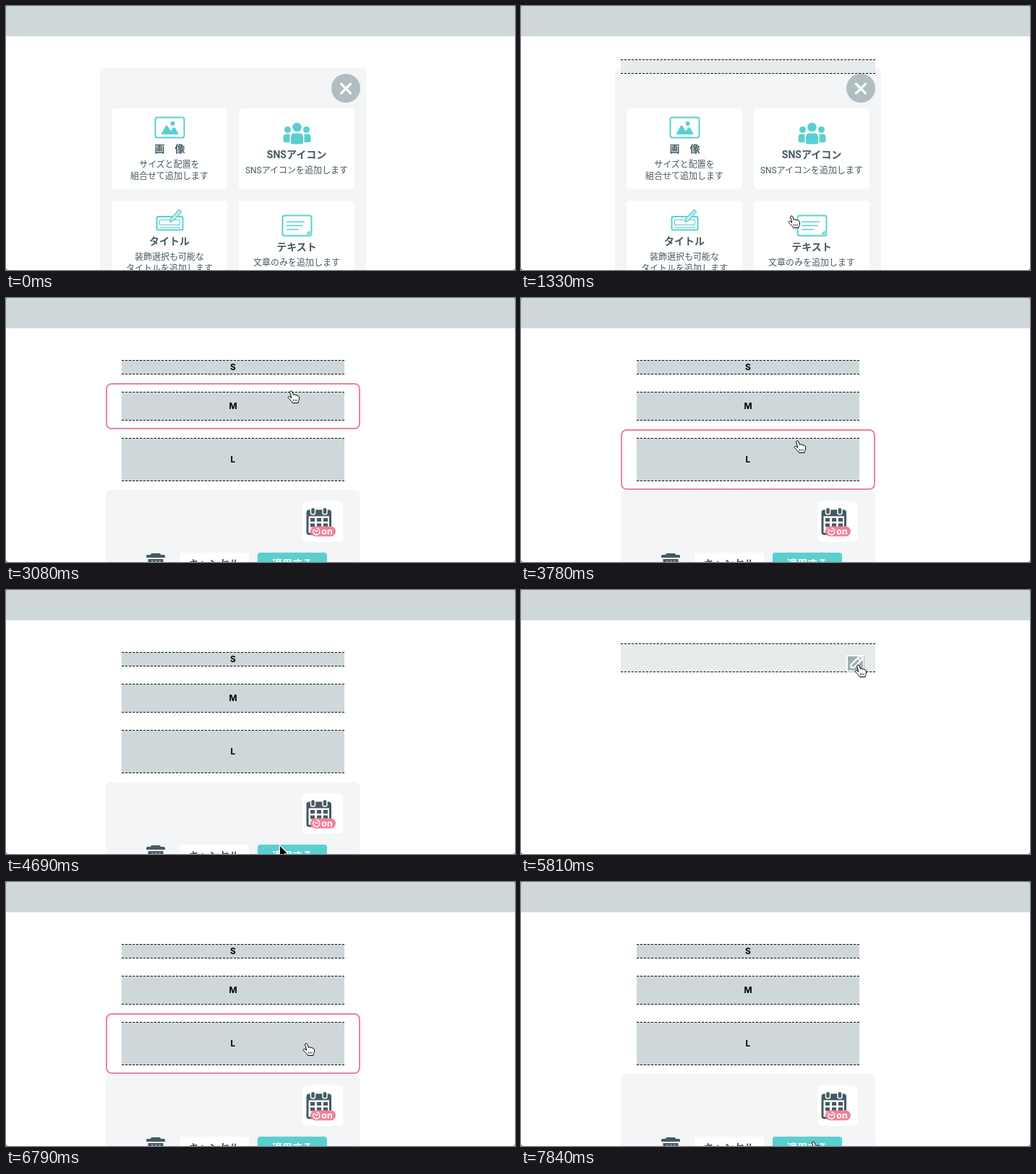
Recreate the animation shown at these times as an HTML page. Size 704 by 366 pixels, loop 8000 ms.

```html
<!DOCTYPE html>
<html lang="ja">
<head>
<meta charset="utf-8">
<title>Spacer block editor</title>
<style>
html, body { margin: 0; width: 100%; height: 100%; overflow: hidden; background: #444; }
svg { display: block; clip-path: inset(0 round 3px); }
text { font-family: Roboto, "Noto Sans CJK JP", "Noto Sans CJK", sans-serif; font-size: 12px; fill: #455a64; text-anchor: middle; }
.title { font-size: 14px; font-weight: 700; }
.size { font: 700 12px Inter, sans-serif; fill: #000; }
.dash { stroke: #000; }
.teal { fill: #5bcfd0; }
.line { fill: none; stroke: #5bcfd0; stroke-width: 2; }
.dark { fill: #455a64; }
.white { fill: #fff; }
.tray { fill: #f3f5f7; }
</style>
</head>
<body>
<svg width="704" height="366" viewBox="0 0 704 366">
  <rect width="704" height="366" fill="#fff"/>
  <rect width="704" height="42" fill="#ced7da"/>

  <g id="panel">
    <rect class="tray" x="130" y="86" width="368" height="300" rx="6"/>
    <circle cx="470" cy="114" r="20" fill="#b0bec1"/>
    <path d="M463.5 108l13 13m0-13l-13 13" stroke="#fff" stroke-width="3.2" stroke-linecap="round"/>
    <g class="white">
      <rect x="146" y="142" width="160" height="112" rx="5"/>
      <rect x="322" y="142" width="160" height="112" rx="5"/>
      <rect x="146" y="270" width="160" height="112" rx="5"/>
      <rect x="322" y="270" width="160" height="112" rx="5"/>
    </g>

    <rect class="line" x="206.5" y="154.5" width="40" height="28" rx="3"/>
    <circle class="teal" cx="230.5" cy="163" r="3"/>
    <path class="teal" d="M214.5 178l6-11.500q1.500-2 3 0l4.500 7 3-4.500q1.500-1.500 3 0l5 9z"/>
    <text class="title" x="226.500" y="203">画　像</text>
    <text x="226" y="223.500">サイズと配置を</text>
    <text x="226" y="239.500">組合せて追加します</text>

    <g class="teal">
      <circle cx="402.500" cy="168" r="6.300"/>
      <circle cx="389.500" cy="171.500" r="4.500"/>
      <circle cx="415.500" cy="171.500" r="4.500"/>
      <path d="M394 182q0-5.500 5-5.500h7q5 0 5 5.500v6.500q0 3-3 3h-11q-3 0-3-3z"/>
      <path d="M392.500 177.500v11.500h-6q-3 0-3-3v-4q0-4.500 4-4.500zM412.500 177.500v11.500h6q3 0 3-3v-4q0-4.500-4-4.500z"/>
    </g>
    <text class="title" x="402" y="211">SNSアイコン</text>
    <text x="402" y="231.500">SNSアイコンを追加します</text>

    <rect class="line" x="208.500" y="292" width="36" height="18.500" rx="2"/>
    <path class="line" style="stroke-width:1" d="M212.500 296.500h28v7h-28zM212 307.500h29"/>
    <path d="M227 299.500l1.500-5.500 11-11.500 3 2.500-10.500 12z" fill="#fff" stroke="#5bcfd0" stroke-width="1.500" stroke-linejoin="round"/>
    <path class="line" style="stroke-width:1" d="M229.500 296l10.500-11.500"/>
    <text class="title" x="226" y="331">タイトル</text>
    <text x="226" y="352">装飾選択も可能な</text>
    <text x="226" y="367.500">タイトルを追加します</text>

    <rect class="line" x="382.500" y="290.500" width="40" height="28" rx="3"/>
    <path class="line" style="stroke-width:1.500" d="M388 299.300h25M388 304.500h23M388 309.800h17"/>
    <path class="teal" d="M420.500 311v5.500h-5.500z"/>
    <text class="title" x="402" y="339">テキスト</text>
    <text x="402" y="359.500">文章のみを追加します</text>
  </g>

  <g id="thinBar"></g>
  <g id="wideBar"></g>

  <g id="pencil">
    <rect x="451" y="91" width="24" height="23" rx="1" fill="#b5babc"/>
    <rect class="white" x="450" y="90" width="24" height="23" rx="1"/>
    <rect id="pencilFill" x="452" y="92" width="21" height="19.500"/>
    <path d="M456.500 107.500v-4l11-11q1.500-1.500 3 0l1 1q1.500 1.500 0 3l-11 11zM466 94.500l3.500 3.500" fill="none" stroke="#fff" stroke-width="2.200" stroke-linejoin="round"/>
  </g>

  <g id="sizes">
    <g id="rows"></g>
    <rect class="tray" x="138" y="266" width="352" height="120" rx="8"/>
    <rect class="white" x="410" y="282" width="56" height="56" rx="6"/>
    <g class="dark">
      <rect x="415.500" y="293.500" width="34.500" height="35" rx="4"/>
      <rect class="white" x="418.500" y="302.500" width="28.500" height="23"/>
      <path d="M421 305h6v5h-6zm9 0h6v5h-6zm9 0h6v5h-6zM421 312.500h6v5h-6zm9 0h6v5h-6zm9 0h6v5h-6z"/>
      <g stroke="#fff" stroke-width="1.500">
        <rect x="421.500" y="290.500" width="6" height="9.500" rx="2.500"/>
        <rect x="438" y="290.500" width="6" height="9.500" rx="2.500"/>
      </g>
    </g>
    <rect x="421" y="316.500" width="35" height="14" rx="7" fill="#ef8299"/>
    <path d="M426 320.500a4.600 4.600 0 1 0 3.300-1.500M427 321.500l2.500 2.300 2-1.500" fill="none" stroke="#fff" stroke-width="1.300"/>
    <text x="444" y="328" style="font:700 12.500px Inter,sans-serif;fill:#fff">on</text>

    <path class="dark" d="M200 356l1-2h12l1 2h4q2 0 2 2v2h-26v-2q0-2 2-2zM196.500 362h21v10h-21z"/>
    <path d="M201 364l3 3m0-3l-3 3M206 364l3 3m0-3l-3 3M211 364l3 3m0-3l-3 3" stroke="#c5cdd0"/>
    <rect class="white" x="240" y="353" width="96" height="32" rx="4"/>
    <text class="title" x="288" y="373">キャンセル</text>
    <rect class="teal" x="348" y="353" width="96" height="32" rx="4"/>
    <text class="title" x="396" y="373" style="fill:#fff">適用する</text>
    <rect id="hover" x="139" width="350" rx="7" fill="none" stroke="#ef8299" stroke-width="2"/>
  </g>

  <g id="cursor">
    <circle id="click" r="30.500" fill="none" stroke="#000" stroke-opacity=".45" stroke-width="2"/>
    <path id="arrow" d="M0 0V14L3.200 11.200 5.600 16.500 8 15.500 5.800 10.200H10Z" stroke="#fff" stroke-width="2" paint-order="stroke"/>
    <g id="hand" stroke="#000" stroke-linejoin="round">
      <path fill="#fff" d="M-1.500 1.300C-1.200-.3 1.300-.4 1.800 1L3.500 5.500C4.300 4.300 6.200 4.600 6.500 6 7.300 5 9 5.400 9.200 6.800 10.300 6.200 11.500 7 11.500 8.500V11C11.500 13 10 14 10 16.500H2.500C2 14.500-1 12.500-3.600 9.500-4.600 8-2.500 6.800-1 8L.8 9.500Z"/>
      <path d="M3.500 11.500v2.500M5.800 11.500v2.500M8 11.500v2.500" stroke-width=".8"/>
    </g>
  </g>
</svg>
<script>
const LOOP = 8000, STEP = 70;
const $ = id => document.getElementById(id);
const show = (id, on) => $(id).style.display = on ? '' : 'none';
const within = (v, a, b) => v >= a && v < b;

const dashedBox = (x, y, w, h, fill, gap) => `
  <rect x="${x}" y="${y}" width="${w}" height="${h}" fill="${fill}"/>
  <path class="dash" stroke-dasharray="3 ${gap}" d="M${x} ${y + .5}h${w}M${x} ${y + h - .5}h${w}"/>`;

$('thinBar').innerHTML = dashedBox(138, 74, 352, 20, '#e6ebeb', 1.986);
$('wideBar').innerHTML = dashedBox(138, 74, 352, 40, '#e6ebeb', 1.986);

const rows = [['S', 86, 20], ['M', 130, 40], ['L', 194, 60]];
$('rows').innerHTML = rows.map(([name, y, h]) =>
  dashedBox(160, y, 308, h, '#ced7da', 2) +
  `<text class="size" x="314" y="${y + h / 2 + 4.3}">${name}</text>`).join('');

// Pointer path: time, x, y, ease-out power of the move leading there
const path = [
  [1330, 374, 291], [1750, 483, 120, 1.6], [1890, 483, 120], [1960, 483, 119],
  [2030, 483, 119], [2100, 482, 119], [2170, 482, 119], [2450, 451, 95, 1.5],
  [2730, 451, 95], [3080, 394, 129, 1.3], [3430, 383, 150, 2], [3710, 383, 150],
  [4200, 380, 359, 1.7], [4620, 380, 359], [4690, 379, 355], [4830, 379, 355],
  [5390, 475, 135, 1.2], [5670, 466, 104, 1.5], [5880, 466, 104], [6440, 415, 224, 1.6],
  [6860, 415, 224], [7700, 402, 359, 1.6], [7770, 403, 360], [7840, 404, 360]
];
const clicks = [[1820, 1960], [2730, 2800], [3570, 3710], [4550, 4690], [5740, 5810], [6650, 6790]];

function pointer(t) {
  const i = path.findIndex(k => k[0] > t);
  if (i < 0) return path[path.length - 1].slice(1, 3);
  const [t0, x0, y0] = path[Math.max(i - 1, 0)], [t1, x1, y1, power = 1] = path[i];
  const e = 1 - (1 - Math.max(0, (t - t0) / (t1 - t0))) ** power;
  return [x0 + (x1 - x0) * e, y0 + (y1 - y0) * e].map(Math.round);
}

function draw(time) {
  const t = Math.floor(time / STEP) * STEP;
  const [x, y] = pointer(t);
  const panel = t < 1960;
  const sizes = within(t, 2800, 4760) || t >= 5880;
  const bar = !panel && !sizes;

  show('panel', panel);
  show('thinBar', within(t, 840, 2800));
  show('wideBar', within(t, 4760, 5880));
  show('pencil', bar);
  show('sizes', sizes);

  const onPencil = bar && within(x, 450, 475) && within(y, 90, 114);
  $('pencilFill').setAttribute('fill', onPencil ? '#9fb0b5' : '#b1bfc4');

  const row = sizes && rows.find(([, top, h]) => within(y, top - 12, top + h + 12));
  show('hover', row);
  if (row) {
    $('hover').setAttribute('y', row[1] - 11);
    $('hover').setAttribute('height', row[2] + 22);
  }

  const onCard = within(x, 322, 482) && (within(y, 142, 254) || y >= 270);
  const onClose = Math.hypot(x - 470, y - 114) < 20;
  const onApply = sizes && y >= 353 && !within(t, 4690, 4760);
  const hand = panel ? onCard || onClose : onPencil || row || onApply;
  show('cursor', t >= 1330);
  show('hand', hand);
  show('arrow', !hand);
  show('click', clicks.some(([a, b]) => within(t, a, b)));
  $('cursor').setAttribute('transform', `translate(${x} ${y})`);
}

function frame() {
  draw(performance.now() % LOOP);
  requestAnimationFrame(frame);
}
frame();
</script>
</body>
</html>
```
